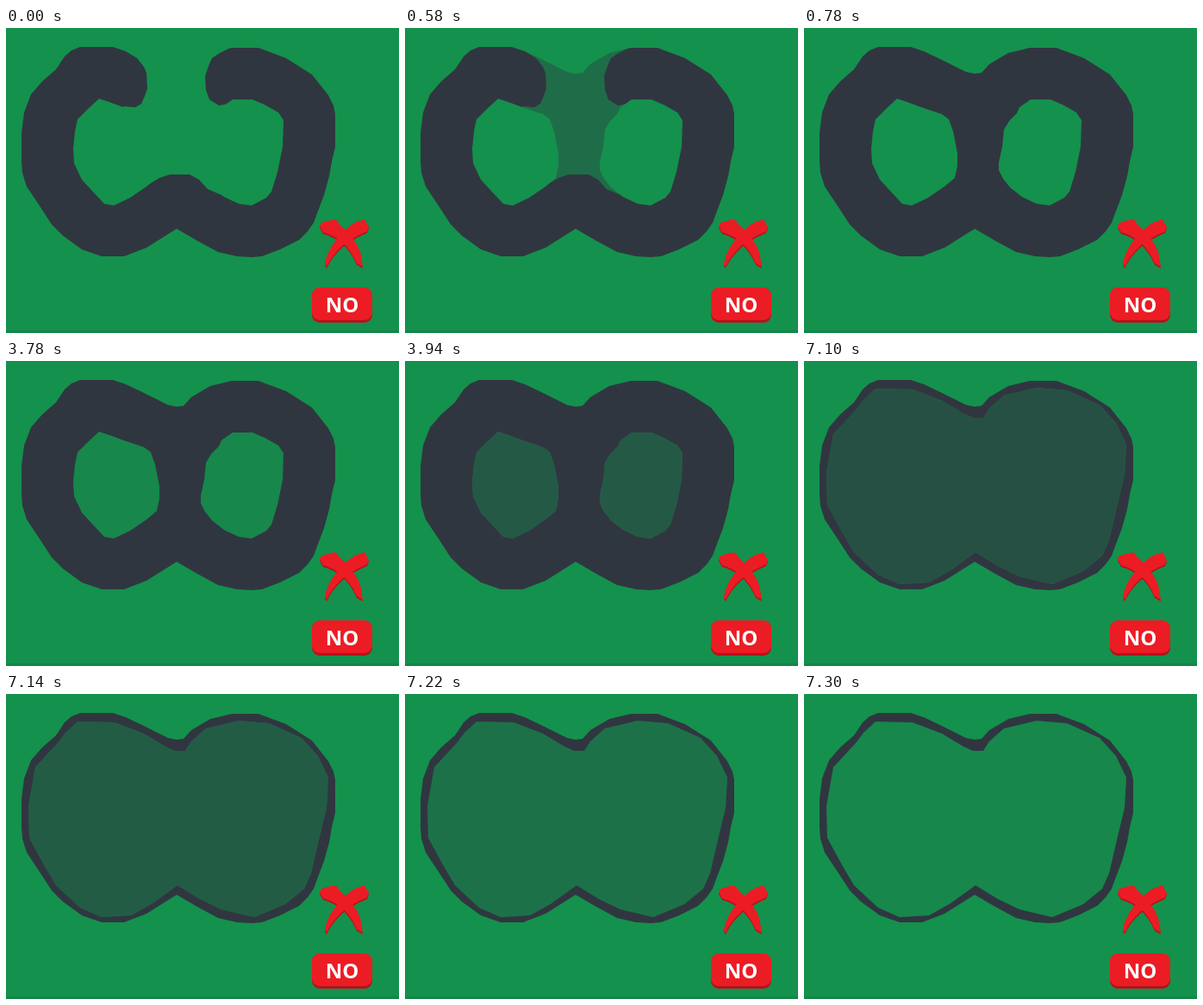
Animation, 456 px wide and 354 px high, one loop 8000 ms. Source, as an HTML page:

```html
<!DOCTYPE html>
<html lang="en">
<head>
<meta charset="utf-8">
<style>
  html, body { margin: 0; height: 100%; overflow: hidden; background: #14914d; }
  svg { display: block; width: 456px; height: 354px; }
  .green { fill: #14914d; }
  .dark { fill: #303640; }
  text { font: bold 24px "Open Sans", sans-serif; fill: #fff; text-anchor: middle; }
</style>
</head>
<body>
<svg viewBox="0 0 456 354">
  <defs>
    <path id="holes" d="M108 82L120 86 139 93 160 100 168 106 173 120 178 145 178 160 175 174 163 184 144 197 125 206 114 204 100 189 88 176 79 157 78 140 80 120 83 106 95 94Z
      M263 83L286 83 300 89 316 98 322 107 321 138 315 167 308 190 302 197 285 206 270 204 253 196 239 185 231 175 226 165 226 156 230 138 232 118 238 108 247 99 250 92Z"/>
    <path id="inner" d="M83 32L126 33 160 46 185 61 196 66 208 66 215 55 232 40 270 31 305 34 343 51 362 72 374 97 372 132 364 165 354 208 346 226 324 244 288 259 250 250 225 238 199 222 170 243 145 257 111 259 86 248 58 222 45 200 27 167 26 130 34 85 60 57 69 45Z"/>
    <path id="cross" d="M364 230Q365 226 369 225L381 222Q385 223 386 227Q405 243 411 260L414 277 407 273Q399 255 388 247Q379 240 368 237Z
      M416 222L421 231 419 236Q402 243 390 253Q378 264 372 277L370 274Q372 260 383 246Q397 229 407 225Z"/>
  </defs>

  <rect class="green" width="456" height="354"/>
  <rect y="351" width="456" height="3" fill="#13864a"/>
  <path class="dark" d="M86 22L124 22 139 27 160 37 188 51 198 53 206 52 215 42 237 29 262 23 293 23 325 35 355 54 374 78 380 90 382 100 382 138 378 155 375 172 369 194 361 215 357 226 350 236 340 246 318 257 297 265 285 266 268 265 246 260 222 247 198 233 163 255 137 265 111 265 88 257 66 241 53 228 40 208 24 184 19 168 18 155 18 122 21 98 29 77 42 62 58 48 68 33 76 26Z"/>

  <g id="ring">
    <use href="#holes" class="green"/>
    <use href="#holes" class="dark" id="holeFill"/>
    <path id="gap" class="green" d="M130 20L139 27 152 35 160 45 163 52 164 70 161 79 157 88 150 92 137 91 120 100 115 190 125 205 144 196 163 183 178 174 190 170 213 170 224 176 234 187 253 195 280 203 300 150 290 90 270 83 258 88 247 90 236 83 232 72 231 56 235 44 239 35 248 29 262 22 262 20Z"/>
  </g>
  <g id="thin">
    <use href="#inner" class="green"/>
    <use href="#inner" class="dark" id="innerFill"/>
  </g>

  <use href="#cross" fill="#b5131b" y="2"/>
  <use href="#cross" fill="#ec1c24"/>
  <rect x="355" y="303" width="70" height="39" rx="9" fill="#b5131b"/>
  <rect x="355" y="301" width="70" height="38" rx="9" fill="#ec1c24"/>
  <text x="390" y="330">NO</text>
</svg>
<script>
  const el = id => document.getElementById(id);
  const LOOP = 8000;

  // Each dissolve is a list of [start time, opacity] holds.
  const gapSteps = [[0, 1], [500, .84], [580, .6], [620, .48], [700, .24], [780, 0]];
  const holeSteps = [[0, 0], [3780, .11], [3820, .23], [3900, .47], [3940, .6], [4020, .84]];
  const innerSteps = [[0, 1], [7100, .7], [7140, .58], [7220, .35], [7300, .11]];

  const held = (steps, t) => steps.findLast(([start]) => t >= start)[1];

  function draw() {
    const t = performance.now() % LOOP;
    const thin = t >= 7100;
    el("gap").style.opacity = held(gapSteps, t);
    el("holeFill").style.opacity = held(holeSteps, t);
    el("innerFill").style.opacity = held(innerSteps, t);
    el("ring").style.display = thin ? "none" : "";
    el("thin").style.display = thin ? "" : "none";
    requestAnimationFrame(draw);
  }
  draw();
</script>
</body>
</html>
```
